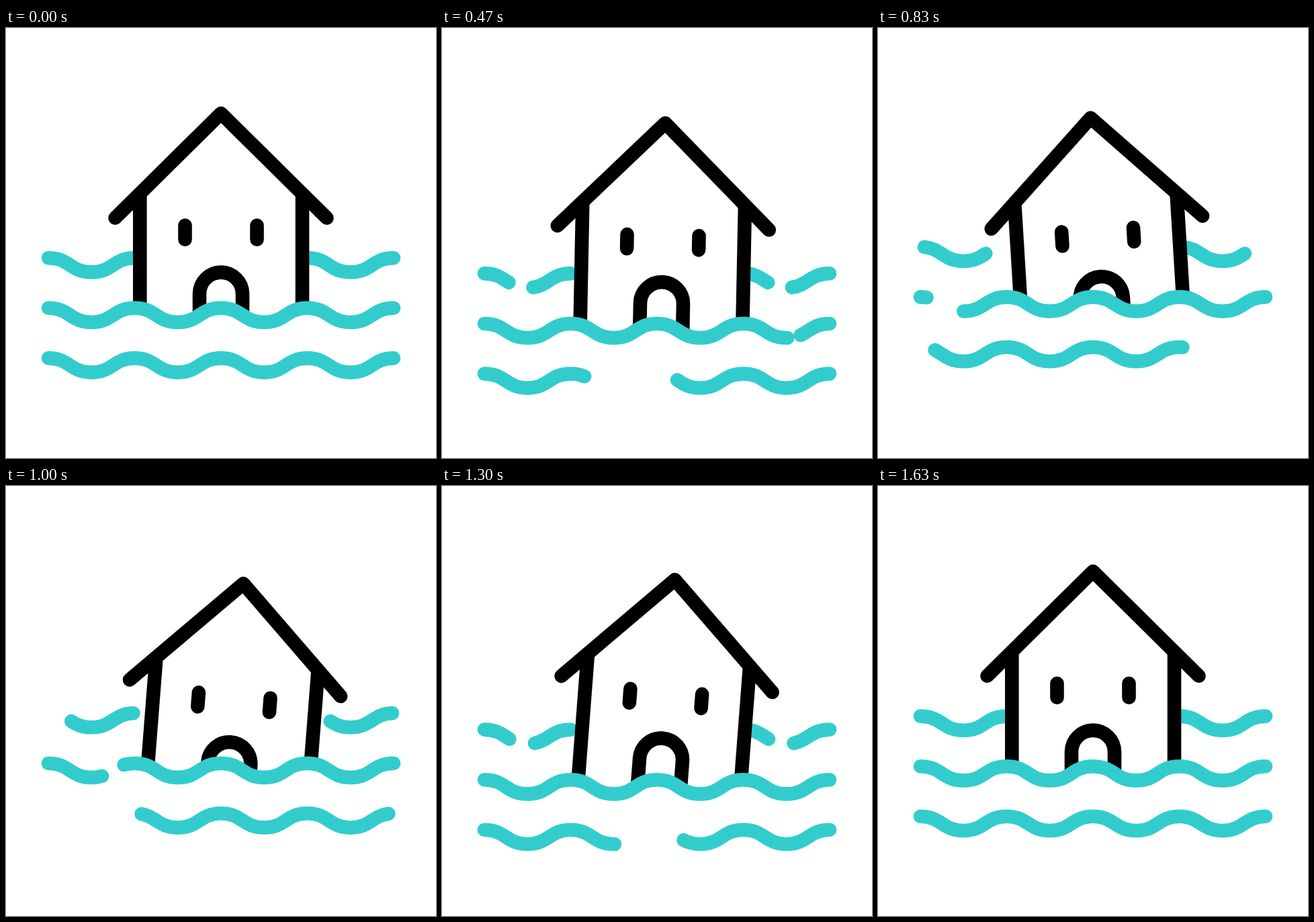
An HTML page that plays this animation: 640 px wide and 640 px high, repeating every 1.67 s.

```html
<!DOCTYPE html>
<html lang="en">
<head>
<meta charset="utf-8">
<title>Flooded house</title>
<style>
  html, body { margin: 0; width: 100%; height: 100%; overflow: hidden; background: #fff; }
  svg { display: block; width: 100vw; height: 100vh; }
  path { fill: none; stroke-width: 20.6; stroke-linecap: round; stroke-linejoin: round; }
  .wave { stroke: #33cccd; }
  .ink { stroke: #000; }
  .blank { fill: #fff; stroke: none; }
</style>
</head>
<body>
<svg viewBox="0 0 640 640">
  <g id="back"></g>
  <g id="house">
    <path class="blank" d="M199 246 320 127 441 246V490H199Z"/>
    <path class="ink" d="M199.3 248V490M441 248V490"/>
    <path class="ink" d="M162.5 282.8 320 127 477.5 282.8"/>
    <path class="ink" d="M266.5 293.7V314.8M373.5 293.7V314.8"/>
    <path class="ink" d="M288 490V395.6A32 32 0 0 1 352 395.6V490"/>
  </g>
  <g id="front"></g>
</svg>
<script>
const LOOP = 1670, STEP = 100 / 3, LAST = 49;
const LEFT = 63, MID_Y = 416.8, ROW = 74.6, HALF = 64.25, DEPTH = 21.2;

// Eased 0 to 1 while f runs from a to b.
function ramp(f, a, b) {
  const x = Math.min(1, Math.max(0, (f - a) / (b - a)));
  return x * x * (3 - 2 * x);
}

// Eased travel from rest through each [step, ...values] and back to rest.
function travel(f, end, stops) {
  let from = 0, pose = stops[0].slice(1).fill(0);
  const result = [...pose];
  for (const [at, ...next] of [...stops, [end, ...pose]]) {
    const k = ramp(f, from, at);
    next.forEach((v, i) => result[i] += (v - pose[i]) * k);
    from = at;
    pose = next;
  }
  return result;
}

const swell = f => travel(f, 50, [[15, 23.5], [25, -16.4], [38, 20.8]]);
const rock = f => travel(f, 43, [[9, .7, 25.3, 7.96], [20, 14.7, .3, -7.8], [35, 10.2, 23.5, 8.76]]);

// Position of a gap's trailing edge and its size, in wave lengths.
const drift = f => .993 + .675 * Math.sin(.07 * (f - 24));
const midDrift = f => .645 + .0192 * f;
const pulse = (f, size, open, full, shrink, shut) => size * (ramp(f, open, full) - ramp(f, shrink, shut));

function wavePath(x, y, halves) {
  let d = `M${x} ${y}`;
  for (let i = 0; i < halves; i++) {
    const dy = i % 2 ? -DEPTH : DEPTH;
    d += `c${HALF / 2} 0 ${HALF / 2} ${dy} ${HALF} ${dy}`;
  }
  return d;
}

function addPath(parent, cls, d) {
  const p = document.createElementNS(parent.namespaceURI, 'path');
  p.setAttribute('class', cls);
  p.setAttribute('d', d);
  p.setAttribute('pathLength', 1);
  return parent.appendChild(p);
}

const [back, house, front] = ['back', 'house', 'front'].map(id => document.getElementById(id));
const backWaves = [0, 6].map(n => addPath(back, 'wave', wavePath(LEFT + n * HALF, MID_Y - ROW, 2)));
// White water body hides the house below the middle wave.
addPath(front, 'blank', wavePath(LEFT, MID_Y, 8) + `V700H${LEFT}Z`);
const midWave = addPath(front, 'wave', wavePath(LEFT, MID_Y, 8));
const lowWave = addPath(front, 'wave', wavePath(LEFT, MID_Y + ROW, 8));

// Leaves a gap of the given size that ends at `end`, wrapping round the line.
function cut(wave, end, size) {
  const base = Math.floor(end - size);
  const a = end - size - base, b = end - base;
  let dash = 'none', offset = 0;
  if (size > .002) {
    if (b < 1) dash = `${a} ${size} ${1 - b} 9`;
    else { dash = `${a - b + 1} 9`; offset = 1 - b; }
  }
  wave.setAttribute('stroke-dasharray', dash);
  wave.setAttribute('stroke-dashoffset', offset);
}

function draw(now) {
  const f = Math.min(LAST, Math.floor((now % LOOP + 5) / STEP));
  const [dy] = swell(f), [x, y, turn] = rock(f);
  for (const g of [back, front]) g.setAttribute('transform', `translate(0 ${dy})`);
  house.setAttribute('transform', `translate(${x} ${y}) rotate(${turn} 320 407.5)`);
  for (const w of backWaves) cut(w, drift(f), pulse(f, .282, 0, 16, 40, 50));
  cut(midWave, midDrift(f), pulse(f, .108, 7, 25, 25, 37));
  cut(lowWave, drift(f), pulse(f, .282, 0, 16, 33, 50));
}

function tick() {
  draw(performance.now());
  requestAnimationFrame(tick);
}
tick();
</script>
</body>
</html>
```
